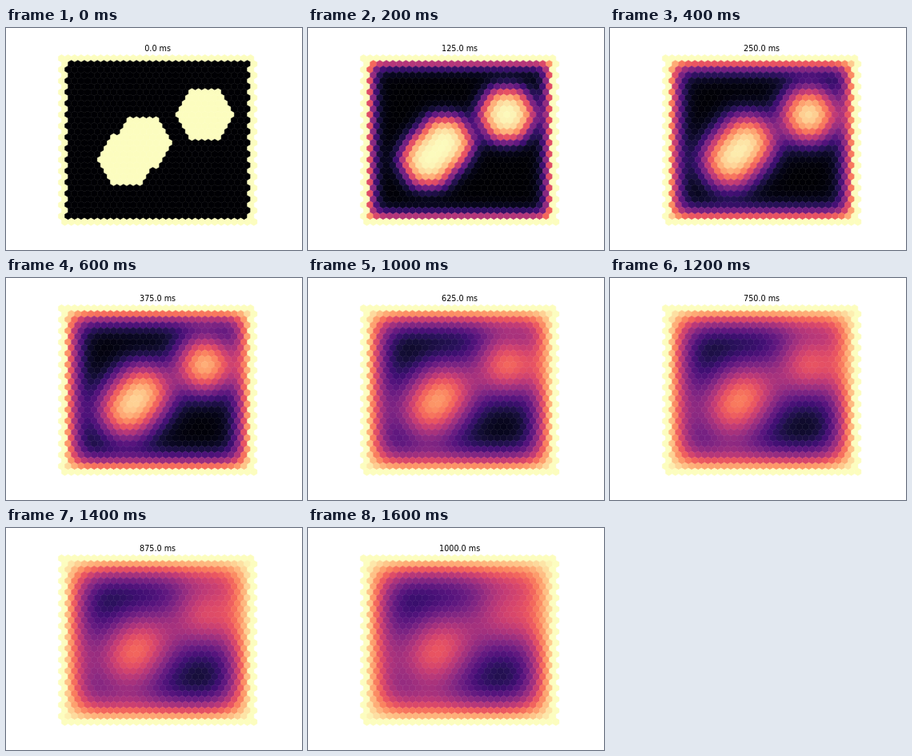
Animation of 370 by 278 pixels, one loop 1.8 s. Source, as an HTML page:

```html
<!DOCTYPE html>
<html lang="en">
<head>
<meta charset="utf-8">
<title>Heat diffusion on a hexagonal grid</title>
<style>
  html, body { margin: 0; width: 100%; height: 100%; overflow: hidden; background: #fff; }
  svg { display: block; width: 370px; height: 278px; }
  text { font: 9.63px "DejaVu Sans", sans-serif; text-anchor: middle; }
  path { stroke-width: .5; }
</style>
</head>
<body>
<svg viewBox="0 0 370 278"><text x="189.6" y="28.6"></text></svg>
<script>
const SIZE = 30, PITCH = 8.148, ROW = PITCH * Math.sqrt(3) / 2, RADIUS = PITCH / Math.sqrt(3);
const LEFT = 69.44, TOP = 38.07;
const FRAMES = 9, FRAME_MS = 200, STEP_MS = 125;
const SUBSTEPS = 32, RATE = 0.1;
const HOT_SPOTS = [[10, 22], [15, 12], [18, 10]]; // row, column
const HOT_RADIUS = 4;

const MAGMA = ("000004 07061c 150e38 29115a 3f0f72 56147d 6a1c81 802582 952c80 ab337c " +
  "c03a76 d6456c e85362 f4685c fa815f fd9a6a feb37b fecc8f fde4a6 fcfdbf")
  .split(" ").map(hex => [0, 2, 4].map(i => parseInt(hex.slice(i, i + 2), 16)));

function magma(value) {
  const x = value * (MAGMA.length - 1), i = Math.min(Math.floor(x), MAGMA.length - 2);
  return `rgb(${MAGMA[i].map((v, k) => Math.round(v + (MAGMA[i + 1][k] - v) * (x - i)))})`;
}

const cells = Array.from({ length: SIZE * SIZE }, (_, i) => [Math.floor(i / SIZE), i % SIZE]);
const isEdge = (r, c) => r % (SIZE - 1) === 0 || c % (SIZE - 1) === 0;

function hexDistance([r1, c1], [r2, c2]) {
  const dr = r2 - r1, dq = c2 - (r2 >> 1) - c1 + (r1 >> 1);
  return Math.max(Math.abs(dr), Math.abs(dq), Math.abs(dr + dq));
}

function diffuse(heat) {
  return heat.map((v, i) => {
    const [r, c] = cells[i];
    if (isEdge(r, c)) return v;
    const up = i - SIZE + (r & 1), down = i + SIZE + (r & 1);
    const sum = heat[i - 1] + heat[i + 1] + heat[up - 1] + heat[up] + heat[down - 1] + heat[down];
    return v + RATE * (sum / 6 - v);
  });
}

let heat = cells.map(cell =>
  isEdge(...cell) || HOT_SPOTS.some(spot => hexDistance(cell, spot) <= HOT_RADIUS) ? 1 : 0);
const states = [];
for (let k = 0; k < FRAMES; k++) {
  states.push(heat.map(magma));
  for (let s = 0; s < SUBSTEPS; s++) heat = diffuse(heat);
}

const svg = document.querySelector("svg"), label = document.querySelector("text");
const hexagons = cells.map(([r, c]) => {
  const path = document.createElementNS(svg.namespaceURI, "path");
  const x = LEFT + (c + (r & 1) / 2) * PITCH, y = TOP + r * ROW;
  const corners = [0, 1, 2, 3, 4, 5].map(k => {
    const angle = (k + 0.5) * Math.PI / 3;
    return [x + RADIUS * Math.cos(angle), y + RADIUS * Math.sin(angle)].map(v => v.toFixed(2));
  });
  path.setAttribute("d", `M${corners.join("L")}Z`);
  svg.append(path);
  return path;
});

let shown = -1;
function draw(now) {
  const k = Math.floor(now / FRAME_MS) % FRAMES;
  if (k !== shown) {
    shown = k;
    label.textContent = `${(k * STEP_MS).toFixed(1)} ms`;
    hexagons.forEach((path, i) => {
      path.setAttribute("fill", states[k][i]);
      path.setAttribute("stroke", states[k][i]);
    });
  }
}

const start = performance.now();
function loop() {
  draw(performance.now() - start);
  requestAnimationFrame(loop);
}
loop();
</script>
</body>
</html>
```
